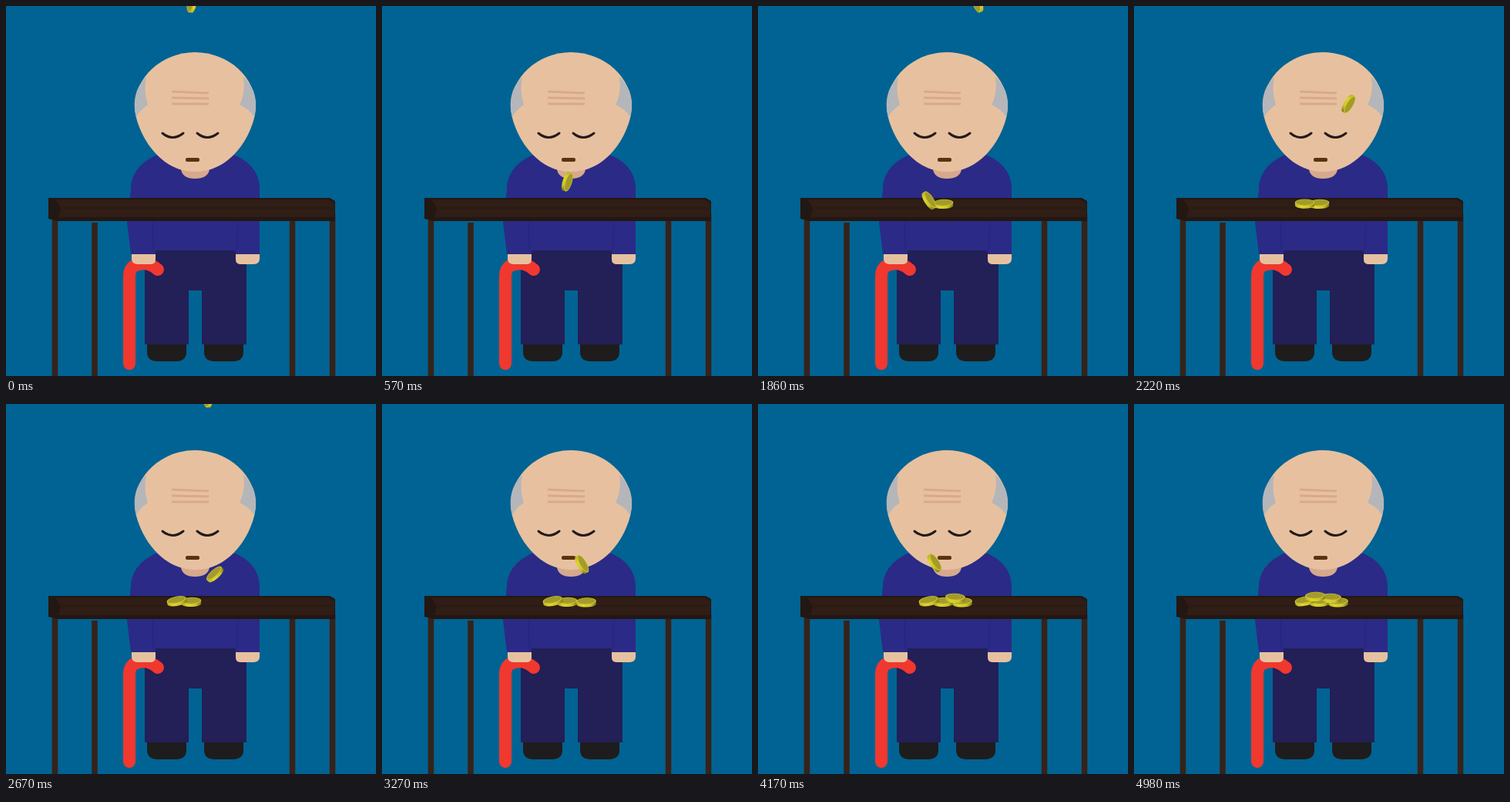
An HTML page that plays this animation: 480x480 px, repeating every 5.43 s.

```html
<!DOCTYPE html>
<html lang="en">
<head>
<meta charset="utf-8">
<title>Coins on the table</title>
<style>
  html, body { margin: 0; width: 100%; height: 100%; overflow: hidden; background: #006393; }
  svg { display: block; width: 100vw; height: 100vh; }
</style>
</head>
<body>
<svg viewBox="0 0 480 480">
  <defs>
    <linearGradient id="rim">
      <stop offset="0" stop-color="#b9b127"/>
      <stop offset=".3" stop-color="#ddd52c"/>
      <stop offset=".7" stop-color="#cdc52a"/>
      <stop offset="1" stop-color="#7c761f"/>
    </linearGradient>
    <g id="coin">
      <path d="M-12.7-2V2C-12.7 7.6 12.7 7.6 12.7 2V-2Z" fill="url(#rim)"/>
      <ellipse cy="-1.6" rx="12.7" ry="4.5" fill="#cfc72b"/>
      <ellipse cy="-1.8" rx="11.6" ry="3.7" fill="#a39b2b"/>
    </g>
  </defs>

  <rect width="480" height="480" fill="#006393"/>

  <!-- trousers and shoes -->
  <path d="M183 436H234V449Q234 461 220 461H197Q183 461 183 449Z
           M257 436H308V449Q308 461 294 461H271Q257 461 257 449Z" fill="#1f1c1d"/>
  <path d="M180 316H312V439H254V369H237V439H180Z" fill="#231f57"/>

  <!-- sweater -->
  <path d="M194 194C174 203 162 218 162 238L157 280L162 322H194V317H298V322H329V238
           C329 216 317 203 298 194Z" fill="#2b2a87"/>
  <path d="M190 279L191 317M301 279L299 317" fill="none" stroke="#262478"/>
  <path d="M227 212H264Q262 224 245 224Q229 224 227 212Z" fill="#d6a98e"/>

  <!-- cane and hands -->
  <path d="M160 464V350Q160 337 173 335Q185 332 197 342" fill="none" stroke="#f0382f"
        stroke-width="16" stroke-linecap="round"/>
  <path d="M163 322H194V329Q194 335 187 335H171Q163 335 163 328Z
           M298 322H329V328Q329 335 321 335H305Q298 335 298 329Z" fill="#e7c19f"/>

  <!-- head -->
  <path d="M245 60C290 60 324 94 324 130C324 158 297 215 245 215C195 215 167 158 167 130
           C167 94 201 60 245 60Z" fill="#e7c19f"/>
  <path d="M182 92C167 106 164 126 169 144Q174 135 184 128Q178 112 182 92Z
           M308 92C324 106 327 126 322 144Q316 134 303 128Q311 112 308 92Z" fill="#b5b6b9"/>
  <path d="M215 111L263 113M215 119L263 120M215 127H263" stroke="#d9a98b" stroke-width="3"/>
  <path d="M203 165Q216 176 230 165M248 165Q261 176 275 165" fill="none" stroke="#231a1b"
        stroke-width="3" stroke-linecap="round"/>
  <rect x="233" y="197" width="18" height="5" rx="2" fill="#5a3310"/>

  <!-- table -->
  <path d="M63.500 270V480M115 281V480M371.500 279V480M423.500 270V480" stroke="#35231a" stroke-width="7.500"/>
  <path d="M55 249H420L427 253V279H68L55 276Z" fill="#231713"/>
  <path d="M64 251H419L426 256V274H68L71 262Z" fill="#2f1d16"/>
  <path d="M71 262H426" stroke="#261812"/>

  <g id="coins"></g>
</svg>
<script>
  const LOOP = 5430, LAST = 4980, STEP = 30;
  const TOP = -4, FALL = 505, HOP = 460, SKIP = 200, SETTLE = 1400;

  // x and r: on entry, at time mid, at rest; hop: height of the first bounce
  const coins = [
    { start: 0,    mid: 1140, x: [241, 240, 240.5], r: [280, -65, -2],  y: 257,   hop: 52 },
    { start: 890,  mid: 1860, x: [230, 222, 221.5], r: [421, 57, -11],  y: 256.5, hop: 52 },
    { start: 1860, mid: 2670, x: [284.500, 271, 265],  r: [250, -42, -2],  y: 257.5, hop: 38 },
    { start: 2687, mid: 3270, x: [262, 259.5, 256], r: [270, 60, 3],    y: 252,   hop: 72 },
    { start: 3570, mid: 4170, x: [226, 229, 235],   r: [273, 57, -2],   y: 250,   hop: 62 }
  ];

  const box = document.getElementById('coins');
  for (const c of coins) {
    c.el = document.createElementNS('http://www.w3.org/2000/svg', 'use');
    c.el.setAttribute('href', '#coin');
    box.append(c.el);
  }

  const mix = (a, b, p) => a + (b - a) * Math.min(1, Math.max(0, p));
  const arc = p => p > 0 && p < 1 ? 4 * p * (1 - p) : 0;

  function height(c, u, r) {
    if (u < 0) return TOP + u * .25;
    const floor = c.y - 4 * Math.abs(Math.sin(r * Math.PI / 180));
    if (u < FALL) return mix(TOP, floor, (u / FALL) ** 2);
    return floor - c.hop * arc((u - FALL) / HOP) - 10 * arc((u - FALL - HOP) / SKIP);
  }

  function place(c, t) {
    const u = t - c.start, mid = c.mid - c.start;
    const along = k => u < mid
      ? mix(k[0], k[1], u / mid)
      : mix(k[1], k[2], (u - mid) / (SETTLE - mid));
    const r = along(c.r);
    c.el.setAttribute('transform', `translate(${along(c.x)} ${height(c, u, r)}) rotate(${r})`);
  }

  function draw(now) {
    const t = Math.min(LAST, Math.floor(now % LOOP / STEP) * STEP);
    coins.forEach(c => place(c, t));
  }

  const begin = performance.now();
  (function frame() {
    draw(performance.now() - begin);
    requestAnimationFrame(frame);
  })();
</script>
</body>
</html>
```
